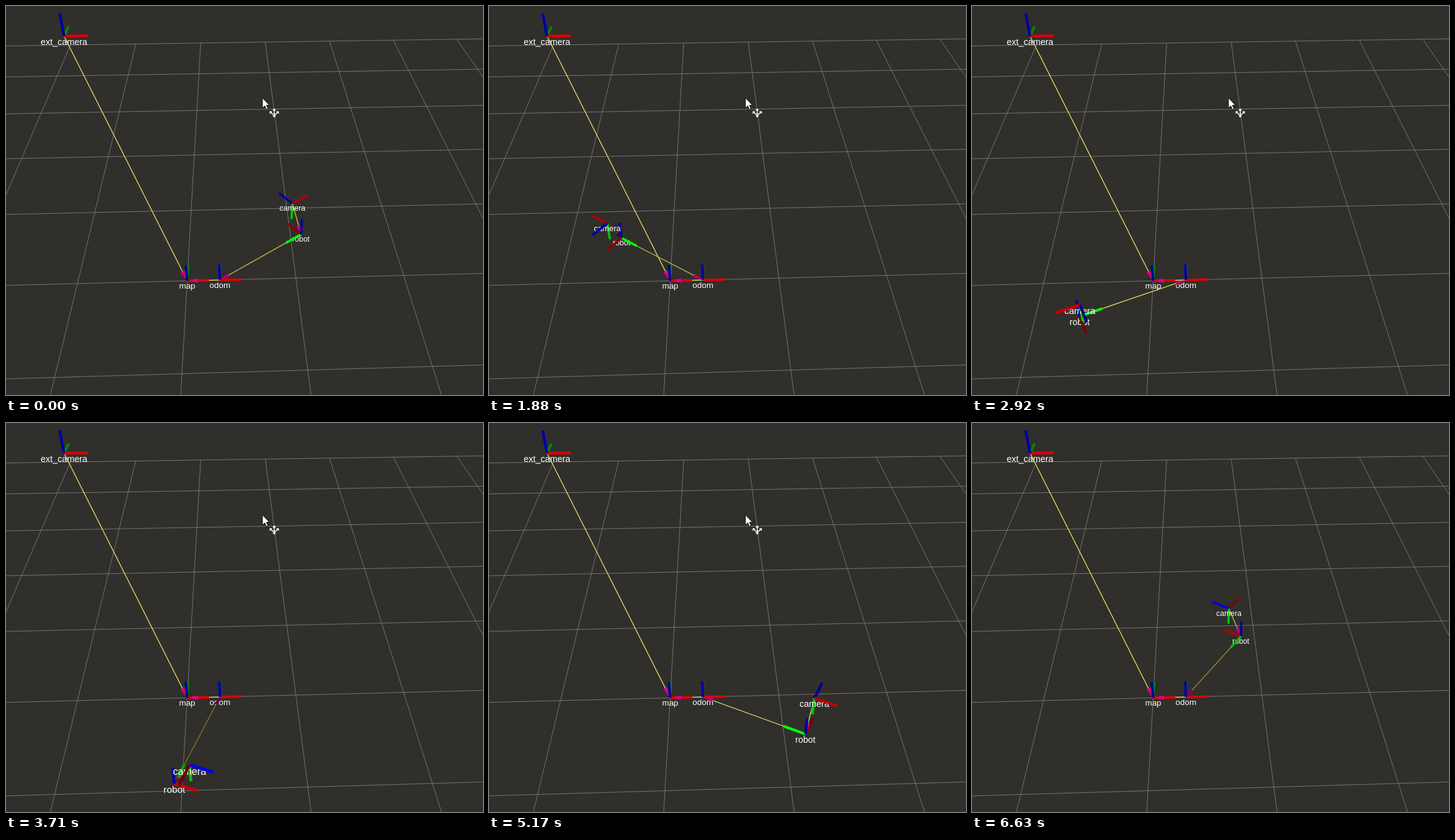
Write an HTML page with a canvas that moves like this. It is 770 px wide and 629 px high and loops after 6.68 s.

```html
<!DOCTYPE html>
<html lang="en">
<head>
<meta charset="utf-8">
<title>Coordinate frames</title>
<style>
  html, body { margin: 0; width: 100%; height: 100%; overflow: hidden; background: #302f2c; }
  canvas { display: block; }
</style>
</head>
<body>
<canvas id="stage" width="770" height="629"></canvas>
<script>
const ctx = document.getElementById('stage').getContext('2d');
const LOOP = 6680, STEP = 125 / 3;
const UNIT = 177.7;                    // pixels per metre at the map origin
const VIEW = [0, 0.777, -0.629];       // viewing direction
const RED = [235, 0, 0], GREEN = [0, 332, 0], BLUE = [0, 0, 280];
const YELLOW = [245, 250, 102], PINK = [235, 0, 135];

const add = (p, d, k = 1) => p.map((v, i) => v + d[i] * k);
const dot = (a, b) => a[0] * b[0] + a[1] * b[1] + a[2] * b[2];
const neg = d => d.map(v => -v);

// Perspective view of a world point: screen x, y and relative depth w.
function project([x, y, z]) {
  const w = 1 + 0.004714 * x + 0.1371 * y - 0.111 * z;
  return {
    x: (292.5 + UNIT * x + 47.44 * y - 42.7 * z) / w,
    y: (444.4 - 2.35 * x - 68.69 * y - 172.9 * z) / w,
    w
  };
}

// Rods facing the viewer side-on are brightest.
function shade(color, dir) {
  const k = 0.05 + 0.9 * (1 - dot(dir, VIEW) ** 2);
  return `rgb(${color.map(c => Math.min(255, Math.round(c * k))).join(',')})`;
}

function line(a, b, width, style) {
  const p = project(a), q = project(b);
  ctx.strokeStyle = style;
  ctx.lineWidth = width;
  ctx.beginPath();
  ctx.moveTo(p.x, p.y);
  ctx.lineTo(q.x, q.y);
  ctx.stroke();
}

function drawGrid() {
  for (let i = -5; i <= 5; i++) {
    line([i, -5, 0], [i, 5, 0], 1, '#747472');
    line([-5, i, 0], [5, i, 0], 1, '#747472');
  }
}

function makeFrame(name, pos, axes = [[1, 0, 0], [0, 1, 0], [0, 0, 1]]) {
  return { name, pos, axes };
}

function axisItems({ pos, axes }) {
  return axes.map((dir, i) => {
    const end = add(pos, dir, 0.2), w = project(add(pos, dir, 0.1)).w;
    const style = shade([RED, GREEN, BLUE][i], dir);
    return { w, draw: () => line(pos, end, 0.023 * UNIT / w, style) };
  });
}

function labelItem({ name, pos }) {
  const p = project(pos);
  return {
    w: p.w,
    draw() {
      ctx.font = `${13.4 / p.w}px "Liberation Sans", Arial, sans-serif`;
      ctx.fillStyle = '#fff';
      ctx.fillText(name, p.x, p.y + 13 / p.w);
    }
  };
}

function makeLink(child, parent, cut = 0.01) {
  const d = add(child.pos, parent.pos, -1);
  const len = Math.hypot(...d);
  return { child, parent, cut, dir: d.map(v => v / len) };
}

function drawShaft({ child, parent, dir }) {
  const end = add(parent.pos, dir, 0.1);
  const w = project(add(parent.pos, dir, 0.3)).w;
  line(child.pos, end, 0.0075 * UNIT / w, shade(YELLOW, dir));
}

function headItem({ parent, dir, cut }) {
  const p = project(add(parent.pos, dir, cut));
  const q = project(add(parent.pos, dir, 0.1));
  return {
    w: project(add(parent.pos, dir, 0.05)).w,
    draw() {
      const len = Math.hypot(q.x - p.x, q.y - p.y) || 1;
      const nx = (p.y - q.y) / len, ny = (q.x - p.x) / len;
      const r = 0.02 * UNIT / q.w, s = r * cut / 0.1;
      ctx.fillStyle = shade(PINK, dir);
      ctx.beginPath();
      ctx.moveTo(p.x + nx * s, p.y + ny * s);
      ctx.lineTo(q.x + nx * r, q.y + ny * r);
      ctx.lineTo(q.x - nx * r, q.y - ny * r);
      ctx.lineTo(p.x - nx * s, p.y - ny * s);
      ctx.fill();
    }
  };
}

function drawScene(angle) {
  const c = Math.cos(angle), s = Math.sin(angle);
  const ahead = [-s, c, 0], left = [-c, -s, 0], up = [0, 0, 1];
  const map = makeFrame('map', [0, 0, 0]);
  const odom = makeFrame('odom', [0.3, 0, 0]);
  const ext = makeFrame('ext_camera', [-0.982, 1.06, 1.9]);
  const robot = makeFrame('robot', add(odom.pos, [c, s, 0]), [ahead, left, up]);
  const eye = add(add(robot.pos, ahead, 0.15), up, 0.3);
  const camera = makeFrame('camera', eye, [neg(left), neg(up), ahead]);

  const frames = [map, odom, ext, robot, camera];
  const links = [
    makeLink(ext, map), makeLink(odom, map, 0.045),
    makeLink(robot, odom), makeLink(camera, robot)
  ];
  links.forEach(drawShaft);
  [...frames.flatMap(axisItems), ...frames.map(labelItem), ...links.map(headItem)]
    .sort((a, b) => b.w - a.w)
    .forEach(item => item.draw());
}

function poly(points) {
  ctx.beginPath();
  points.forEach(([x, y]) => ctx.lineTo(x, y));
  ctx.closePath();
}

// Small arrow head at x, y, turned by a (0 points up).
function tip(x, y, a) {
  ctx.save();
  ctx.translate(x, y);
  ctx.rotate(a);
  poly([[0, -2], [3, 1.5], [-3, 1.5]]);
  ctx.fill();
  ctx.restore();
}

function drawCursor(x, y, panning) {
  ctx.save();
  ctx.translate(x, y);
  poly([[0, 0], [0, 16.5], [3.8, 13], [6.4, 19], [9, 17.8], [6.4, 12], [11, 11.8]]);
  ctx.fillStyle = '#fff';
  ctx.strokeStyle = '#111';
  ctx.lineWidth = 1;
  ctx.fill();
  ctx.stroke();

  ctx.translate(19, 24);
  ctx.strokeStyle = '#fff';
  ctx.lineWidth = 1.4;
  ctx.beginPath();
  ctx.moveTo(0, -5);
  ctx.lineTo(0, 6);
  if (panning) {
    ctx.moveTo(-6, 0);
    ctx.lineTo(6, 0);
  } else {
    ctx.moveTo(-6, -1);
    ctx.quadraticCurveTo(0, 7, 6, -1);
  }
  ctx.stroke();
  tip(0, -5, 0);
  tip(0, 6, Math.PI);
  tip(-6, panning ? 0 : -1, panning ? -Math.PI / 2 : -0.6);
  tip(6, panning ? 0 : -1, panning ? Math.PI / 2 : 0.6);
  ctx.restore();
}

function placeCursor(t) {
  if (t >= 5980) return;
  const k = Math.min(1, Math.max(0, (t - 5440) / 290));
  const e = k * k * (3 - 2 * k);
  drawCursor(414 - 117 * e, 148.5 - 129 * e, k > 0);
}

function render(now) {
  const t = now % LOOP;
  const tick = Math.min(159, Math.floor((t + 5) / STEP)) * STEP;
  ctx.fillStyle = '#302f2c';
  ctx.fillRect(0, 0, 770, 629);
  ctx.textAlign = 'center';
  drawGrid();
  drawScene(0.632 + tick / 1000);
  placeCursor(tick);
}

const start = performance.now();
function loop() {
  render(performance.now() - start);
  requestAnimationFrame(loop);
}
loop();
</script>
</body>
</html>
```
